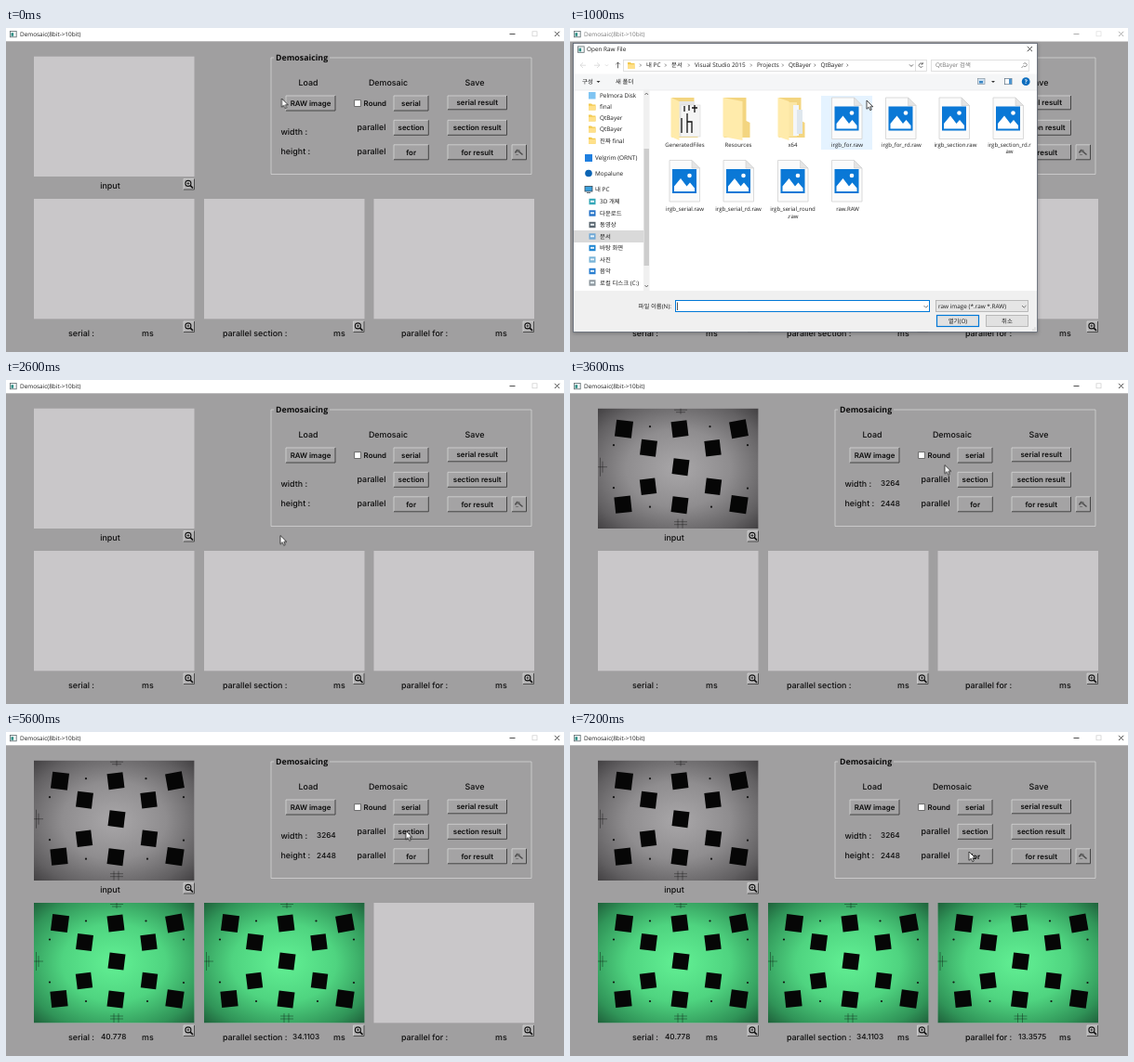
An HTML page that plays this animation: 600 by 349 pixels, repeating every 8000 ms.

```html
<!DOCTYPE html>
<html lang="ko">
<head>
<meta charset="utf-8">
<title>Demosaic</title>
<style>
html, body { margin: 0; width: 100%; height: 100%; overflow: hidden; background: #a09fa0; }
svg { display: block; }
text { white-space: pre; text-rendering: geometricPrecision; }
.ui { font: 400 6.4px "Open Sans", "Noto Sans CJK KR", sans-serif; fill: #1c1c1c; }
.file { font-size: 6.05px; text-anchor: middle; }
.lab { font: 500 8.9px Inter, sans-serif; fill: #0c0c0c; }
.num { font-size: 8.2px; }
.btn { font: 600 7.9px Inter, sans-serif; fill: #0c0c0c; text-anchor: middle; }
.head { font: 700 8.8px "Open Sans", sans-serif; fill: #0c0c0c; }
.dim { fill: #777; }
.mid { text-anchor: middle; }
#dialog { filter: drop-shadow(0 1px 2px rgba(0, 0, 0, .28)); }
</style>
</head>
<body>
<svg id="stage" width="600" height="349" viewBox="0 0 600 349">
  <defs>
    <radialGradient id="grey" r=".72">
      <stop offset="0" stop-color="#a9a7a9"/><stop offset=".45" stop-color="#8f8d8f"/>
      <stop offset=".8" stop-color="#626062"/><stop offset="1" stop-color="#3f3d3f"/>
    </radialGradient>
    <radialGradient id="green" r=".72">
      <stop offset="0" stop-color="#62f094"/><stop offset=".45" stop-color="#4fd480"/>
      <stop offset=".8" stop-color="#309458"/><stop offset="1" stop-color="#1d5c38"/>
    </radialGradient>
    <g id="lens">
      <rect width="11.5" height="11.5" fill="#b4b3b4"/>
      <path d="M0 11.5V0H11.5" fill="none" stroke="#d4d4d4" stroke-width=".8"/>
      <path d="M11.5 0V11.5H0" fill="none" stroke="#444" stroke-width=".9"/>
      <circle cx="4.9" cy="4.9" r="3" fill="#d5d4d5" stroke="#111" stroke-width="1.1"/>
      <path d="M3.3 4.9H6.5M4.9 3.3V6.5" stroke="#111" stroke-width=".8"/>
      <path d="M7.2 7.2L10 10" stroke="#111" stroke-width="1.7"/>
    </g>
    <g id="app">
      <rect x=".4" y=".4" width="6.8" height="6.4" fill="#f4f6f6" stroke="#5d6b6e" stroke-width=".8"/>
      <rect x="1.5" y="2.2" width="2.6" height="3.6" fill="#2f8f86"/>
    </g>
    <g id="page">
      <path d="M-16 0H8L16.5 8.5V44.5H-16Z" fill="#fbfbfb" stroke="#d2d2d2" stroke-width=".8"/>
      <path d="M8 0V8.5H16.5Z" fill="#e4e4e4" stroke="#cfcfcf" stroke-width=".6"/>
      <rect x="-13" y="9.5" width="26" height="26" fill="#0a78d6"/>
      <path d="M-11 33.5V28L-4 19.5L2.5 28L6 24L11 30V33.5Z" fill="#fff"/>
      <circle cx="5.5" cy="16.5" r="2.3" fill="#fff"/>
    </g>
    <g id="smallFolder">
      <path d="M0 1H3L4 2H7.5V8H0Z" fill="#f2c94f"/><path d="M0 3.2H7.5V8H0Z" fill="#ffe08a"/>
    </g>
  </defs>
  <g id="scene"></g>
</svg>
<script>
const LOOP = 8000, TICK = 200;
const rect = (x, y, w, h, fill, stroke = 'none', sw = .8) =>
  `<rect x="${x}" y="${y}" width="${w}" height="${h}" fill="${fill}" stroke="${stroke}" stroke-width="${sw}"/>`;
const line = (d, stroke, sw = .8) => `<path d="${d}" fill="none" stroke="${stroke}" stroke-width="${sw}"/>`;
const fill = (d, color) => `<path d="${d}" fill="${color}"/>`;
const dot = (x, y, r, color) => `<circle cx="${x}" cy="${y}" r="${r}" fill="${color}"/>`;
const text = (x, y, s, cls) =>
  `<text x="${x}" y="${y}" class="${cls}">${s.replace(/>/g, '&gt;')}</text>`;
const use = (id, x, y) => `<use href="#${id}" x="${x}" y="${y}"/>`;
const group = (id, ...parts) => `<g id="${id}">${parts.join('')}</g>`;
const each = (list, fn) => list.map(a => fn(...a)).join('');

const button = ([x, y, w, h, label], down = false) => {
  const [near, far] = down ? ['#454545', '#d6d6d6'] : ['#d6d6d6', '#454545'];
  return rect(x, y, w, h, '#a4a3a4') + line(`M${x} ${y + h}V${y}H${x + w}`, near) +
    line(`M${x + w} ${y}V${y + h}H${x}`, far, 1) +
    text(x + w / 2 + down, y + h / 2 + 2.8 + down, label, 'btn');
};
const buttons = {
  raw: [301, 73, 53, 16, 'RAW image'], serial: [417, 73, 37, 16, 'serial'],
  section: [417, 99.3, 37.3, 16, 'section'], for: [417, 125.8, 37.3, 16, 'for'],
  saveSerial: [475, 73, 63.5, 14.8, 'serial result'], saveSection: [475, 99.3, 63.5, 16, 'section result'],
  saveFor: [475, 125.8, 63.5, 16, 'for result'], tool: [544, 125.8, 15.5, 16, '']
};

// Test chart: tilted squares, dots and ruler marks
const squares = [
  [28, 22, 18, 7], [88, 22, 17, -7], [151.5, 22, 18, -10],
  [54.5, 42.5, 17, 7], [123.5, 42.5, 16.5, -7], [89, 63, 17, 7],
  [54, 84, 16.5, -7], [124, 84, 16.5, 7],
  [27, 103.5, 17.5, -6], [88, 104, 17, 7], [151.5, 103.5, 18, 8]
];
const specks = [[56, 19.5], [120.5, 19.5], [17, 39.5], [161, 39.5], [17, 85.5], [161, 86], [56, 106], [122, 106]];
const marks = 'M82 1.5H96M84 4H94M89 0V6M82 122H96M82 125H96M86 119V129M91 119V129M0 63H10M2.5 53V73M5 57V69';
const photo = (x, y, tone) => `<g transform="translate(${x} ${y})">` +
  rect(0, 0, 172.5, 129.3, `url(#${tone})`) + line(marks, 'rgba(0,0,0,.6)', .6) +
  each(squares, (cx, cy, s, a) =>
    `<rect x="${-s / 2}" y="${-s / 2}" width="${s}" height="${s}" fill="#060606" transform="translate(${cx} ${cy}) rotate(${a})"/>`) +
  each(specks, (cx, cy) => dot(cx, cy, 1.1, '#141414')) + '</g>';

const titleBar = (cls, ink, faint) =>
  rect(0, 0, 600, 14.3, '#fff') + use('app', 4, 3) + text(15, 9.2, 'Demosaic(8bit->10bit)', `ui ${cls}`) +
  line('M541.5 6.5H547.5', ink) + rect(566, 3.8, 5, 5, 'none', faint, .7) +
  line('M590 3.8L595.2 9M595.2 3.8L590 9', ink);

const app = () =>
  rect(0, 0, 600, 349, '#a09fa0') + titleBar('', '#222', '#ccc') +
  each([[30, 30.7], [30, 184], [213, 184], [395.5, 184]], (x, y) => rect(x, y, 172.5, 129.3, '#c9c7c9')) +
  each([[191, 162.5], [191, 316], [373.5, 316], [556, 316]], (x, y) => use('lens', x, y)) +
  line('M288 32H285V157.5H565V32H348', '#d3d3d3') + text(290, 35.2, 'Demosaicing', 'head') +
  each([
    [325, 62.3, 'Load'], [411, 62.3, 'Demosaic'], [504, 62.3, 'Save'],
    [393, 110.2, 'parallel'], [393, 136.3, 'parallel'], [112, 173.3, 'input']
  ], (x, y, s) => text(x, y, s, 'lab mid')) +
  each([
    [295.5, 115, 'width :'], [295.5, 136.2, 'height :'], [67, 332, 'serial :'], [146, 332, 'ms'],
    [233, 332, 'parallel section :'], [352, 332, 'ms'], [425, 332, 'parallel for :'], [526, 332, 'ms']
  ], (x, y, s) => text(x, y, s, 'lab')) +
  rect(374.7, 77.7, 6.8, 6.8, '#fff', '#555') + text(396.8, 83.9, 'Round', 'btn') +
  Object.values(buttons).map(b => button(b)).join('') +
  line('M547.5 134.5L549.5 131.5L552 133.5L555.5 136.5', '#4a4a4a', 1.5) + dot(551, 132.3, 1.6, '#666') +
  line('M548 136.5H551', '#6a6a6a');

const folder = (cx, flap, inside) =>
  fill(`M${cx - 14} 75H${cx + 10}V100L${cx + 14} 102V118H${cx - 14}Z`, '#f3d580') + inside +
  fill(`M${cx - 15} 75L${cx - 15 + flap} 79V121L${cx - 15} 117Z`, '#ffebab');

const sideItems = [
  [32, 85, 'final'], [32, 97, 'QtBayer'], [32, 109, 'QtBayer'], [32, 121.3, '진짜 final']
];
const places = [
  ['3D 개체', '#35a7b8'], ['다운로드', '#2472c8'], ['동영상', '#5b6770'], ['문서', '#6fa8d6'],
  ['바탕 화면', '#1f86d2'], ['사진', '#79b4d8'], ['음악', '#2a7fd0'], ['로컬 디스크 (C:)', '#8d979e']
];
const side = () =>
  rect(20, 69, 7.5, 7.5, '#7fc4f2') + text(32, 74.8, 'Pelmora Disk', 'ui') +
  each(sideItems, (x, y, s) => use('smallFolder', 20, y - 4.5) + text(x, y + 2.3, s, 'ui')) +
  rect(16, 136, 8, 8, '#1f7fe0') + text(27, 142.3, 'Velgrim (ORNT)', 'ui') +
  dot(20, 156.5, 3.8, '#0a64b4') + text(27, 158.8, 'Mopalune', 'ui') +
  rect(16, 170.5, 8, 5.5, '#3aa0dc', '#3b4a55') + line('M18 177.5H22', '#3b4a55') + text(27, 176.3, '내 PC', 'ui') +
  rect(4, 218, 75, 13, '#d9d9d9') +
  places.map(([s, c], i) => {
    const y = 187 + 12.5 * i;
    return rect(20.5, y - 3.2, 7, 6.4, c) + rect(22, y - 1.2, 4, 2, '#e8f2f8') + text(32, y + 2.3, s, 'ui');
  }).join('') +
  rect(79, 67, 6.5, 216, '#f0f0f0') + rect(79.5, 130, 5.5, 126, '#cdcdcd') +
  line('M80.5 72L82.3 70L84 72M80.5 277L82.3 279L84 277', '#555');

const files = () =>
  folder(123.5, 9, rect(115, 79, 19, 38, '#e6e6e6') + rect(119, 83, 21, 34, '#f4f4f4', '#d0d0d0', .5) +
    line('M120 97V113M126 92V113M126 101H131V113M123 84V90M128 83V89M134 83V91M131 86H137', '#111', 1.3)) +
  folder(179.5, 21, '') +
  folder(238.5, 12, rect(233, 80, 11, 37, '#fbe6a4') + rect(240, 83, 6, 33, '#f4f6f8') + rect(244, 88, 6, 26, '#dfe7ee')) +
  each([[297.5, 75], [355.5, 75], [413, 75], [471, 75], [123, 142.5], [181, 142.5], [239.5, 142.5], [297.5, 142.5]],
    (x, y) => use('page', x, y)) +
  each([
    [123.5, 127.9, 'GeneratedFiles'], [181, 127.9, 'Resources'], [239.5, 127.9, 'x64'],
    [298, 127.9, 'irgb_for.raw'], [356.3, 127.9, 'irgb_for_rd.raw'], [414.5, 127.9, 'irgb_section.raw'],
    [472.5, 127.9, 'irgb_section_rd.r'], [472.5, 135.2, 'aw'],
    [123.5, 197, 'irgb_serial.raw'], [181, 197, 'irgb_serial_rd.raw'],
    [239.5, 197, 'irgb_serial_round'], [239.5, 204.6, '.raw'], [298.5, 197, 'raw.RAW']
  ], (x, y, s) => text(x, y, s, 'ui file'));

const crumbs = [
  [82, '내 PC'], [109, '문서'], [134, 'Visual Studio 2015'], [201, 'Projects'], [235, 'QtBayer'], [269.5, 'QtBayer']
];
const chevron = x => line(`M${x} 38.6L${x + 1.5} 40.1L${x} 41.6`, '#555', .7);
const dialog = () =>
  rect(3.5, 16.5, 499, 311, '#fff', '#5c6470') +
  use('app', 8, 19.5) + text(18, 25.2, 'Open Raw File', 'ui') +
  line('M491.8 20L497 25.2M497 20L491.8 25.2', '#222') +
  line('M11 40.2H17M14 37.4L11 40.2L14 43M26 40.2H32M29 37.4L32 40.2L29 43M38 39.4L39.5 41L41 39.4', '#d6d6d6') +
  line('M51.5 43.3V37M49.3 39.2L51.5 37L53.7 39.2', '#444') +
  rect(57.5, 34.5, 326, 12, '#fff', '#d9d9d9') + rect(388.5, 34.5, 105, 12, '#fff', '#d9d9d9') +
  use('smallFolder', 62, 36) +
  each(crumbs, (x, s) => chevron(x - 7) + text(x, 42, s, 'ui')) + chevron(297.5) +
  line('M365 39.4L367 41.4L369 39.4', '#444') + line('M371.5 34V47', '#d9d9d9') +
  line('M379 38.6A2.2 2.2 0 1 0 379.4 41M379.3 37V39H377.2', '#444', .7) +
  text(393, 42, 'QtBayer 검색', 'ui dim') +
  line('M487.5 40.8L485.5 43M487.5 39A1.9 1.9 0 1 1 487.6 40.6', '#666', .7) +
  rect(4, 49.5, 498, 17.5, '#f5f6f7') + line('M4 67H502', '#e4e5e6', .6) +
  text(13, 60, '구성', 'ui') + fill('M28.5 57H32.5L30.5 59ZM453 57H457L455 59Z', '#333') +
  text(49, 60, '새 폴더', 'ui') +
  rect(438.5, 54.5, 7.5, 6, '#cfe2f2', '#7c8b97', .6) + rect(440, 57, 4, 2.5, '#3a86c4') +
  rect(467.5, 54.5, 7.5, 6.2, '#fff', '#5d7182', .7) + rect(472, 54.8, 3, 5.6, '#4b94d0') +
  dot(490.2, 57.7, 4.4, '#0a6cbe') + '<text x="490.2" y="60.1" class="ui mid" style="fill:#fff;font-weight:700">?</text>' +
  side() +
  group('hoverFor', rect(270, 73, 55, 58, '#e5f3ff')) +
  group('hoverRaw', rect(270, 139.5, 55, 61, '#e5f3ff')) +
  group('pick', rect(270.5, 139.5, 54, 61, '#cce8ff', '#99d1ff')) +
  files() +
  group('tint', rect(281.5, 142.5, 32.5, 44.5, 'rgba(150,205,250,.2)')) +
  rect(4, 283, 498, 44, '#f0f0f0') + text(73.5, 302.3, '파일 이름(N):', 'ui') +
  rect(113.5, 293.5, 273, 12, '#fff', '#0078d7', 1) + line('M115.5 295.5V304', '#111', .7) +
  group('picked', text(115.5, 302.3, 'raw.RAW', 'ui')) +
  rect(393.5, 293.5, 99, 12, '#e5e5e5', '#adadad') + text(396, 302.3, 'raw image (*.raw *.RAW)', 'ui') +
  line('M380.5 299L382.7 301.2L385 299M486 299L488.2 301.2L490.5 299', '#444', .7) +
  rect(394.5, 309.5, 45, 12, '#e1e1e1', '#0078d7', 1.2) + text(417, 318, '열기(O)', 'ui mid') +
  rect(447.5, 309.5, 45, 12, '#e1e1e1', '#adadad') + text(470, 318, '취소', 'ui mid') +
  dot(500, 325, .6, '#aaa') + dot(498, 325, .6, '#aaa') + dot(500, 323, .6, '#aaa');

document.getElementById('scene').innerHTML = [
  app(),
  ...['raw', 'serial', 'section', 'for'].map(k => group(k + 'Down', button(buttons[k], true))),
  group('input', photo(30, 30.7, 'grey'), text(334, 114.4, '3264', 'lab num'), text(334, 135.5, '2448', 'lab num')),
  group('serial', photo(30, 184, 'green'), text(102, 331.3, '40.778', 'lab num')),
  group('section', photo(213, 184, 'green'), text(308, 331.3, '34.1103', 'lab num')),
  group('for', photo(395.5, 184, 'green'), text(482, 331.3, '13.3575', 'lab num')),
  group('inactive', titleBar('dim', '#999', '#ddd')),
  group('dialog', dialog()),
  group('cursor', '<path d="M0 0V9.3L2.2 7.3L3.8 10.7L5.3 10L3.8 6.8H6.8Z" fill="#fff" stroke="#111" stroke-width=".75"/>')
].join('');

// Visible spans: [id, from, to]
const spans = [
  ['rawDown', 600, 800], ['inactive', 1000, 2600], ['dialog', 1000, 2600],
  ['hoverFor', 1000, 1600], ['hoverRaw', 1800, 2200],
  ['pick', 2200, 2600], ['tint', 2200, 2600], ['picked', 2200, 2600], ['input', 2800, LOOP],
  ['serialDown', 4000, 4200], ['serial', 4400, LOOP],
  ['sectionDown', 5200, 5400], ['section', 5600, LOOP],
  ['forDown', 6800, 7000], ['for', 7200, LOOP]
];
// Pointer moves: [from, to, x, y], each easing on from the last place
const start = [296.5, 76];
const moves = [
  [0, 400, 319, 78], [1000, 2000, 295, 167.5], [3000, 3800, 423, 77.5],
  [4600, 5000, 430, 106.5], [6000, 6600, 429, 129]
];
const pointAt = t => {
  let [x, y] = start;
  for (const [from, to, toX, toY] of moves) {
    const u = Math.min(1, Math.max(0, (t - from) / (to - from)));
    const k = u * u * (3 - 2 * u);
    x += (toX - x) * k;
    y += (toY - y) * k;
  }
  return `translate(${x}px, ${y}px)`;
};
const play = (id, frames) => {
  const run = document.getElementById(id).animate(
    frames.map(f => ({ ...f, easing: 'step-end' })), { duration: LOOP, iterations: Infinity });
  run.startTime = document.timeline.currentTime;
};

for (const [id, from, to] of spans) {
  const end = to < LOOP ? 0 : 1;
  play(id, [
    { opacity: 0, offset: 0 }, { opacity: 1, offset: from / LOOP },
    { opacity: end, offset: to / LOOP }, { opacity: end, offset: 1 }
  ]);
}
play('cursor', Array.from({ length: LOOP / TICK + 1 }, (_, i) => ({
  transform: pointAt(i * TICK), offset: i * TICK / LOOP
})));
</script>
</body>
</html>
```
